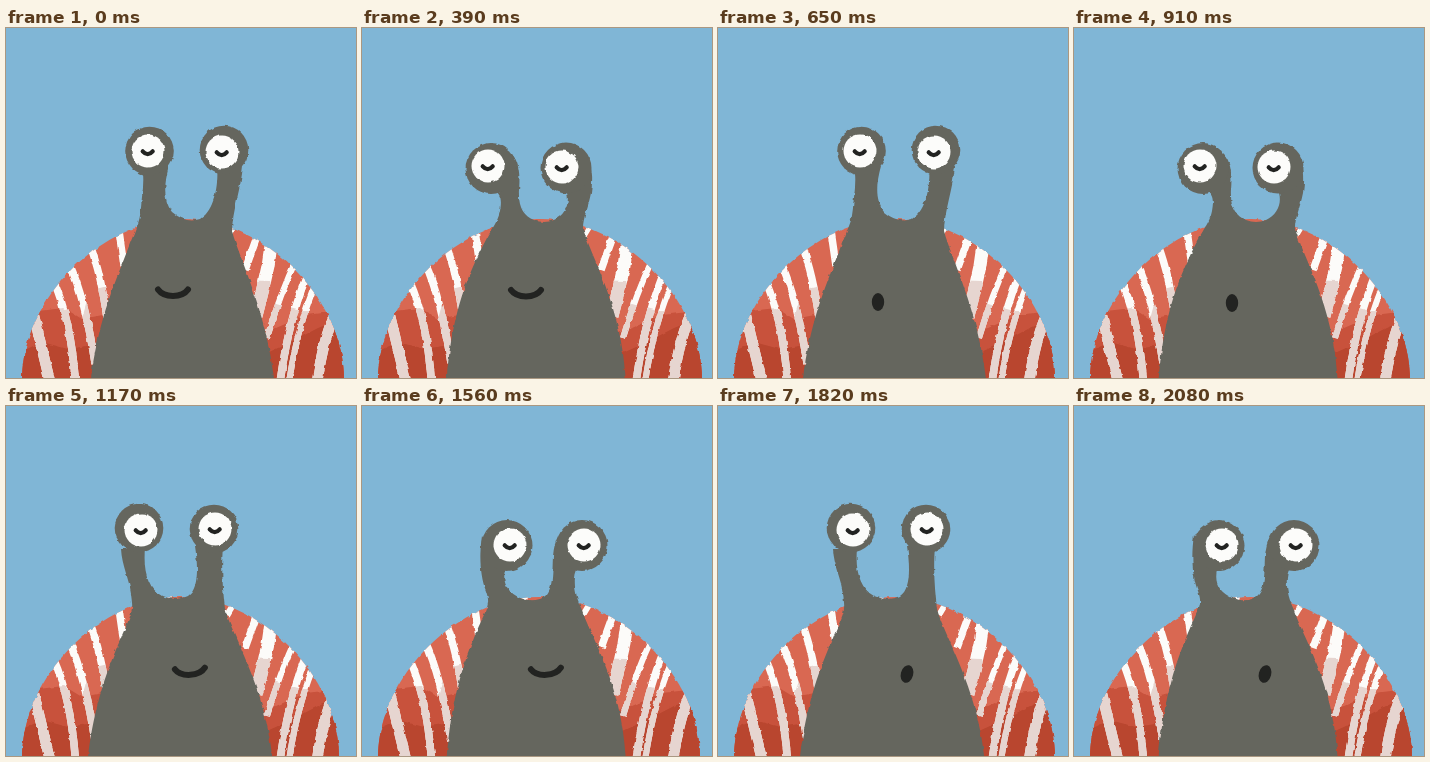
Recreate the animation shown at these times as an HTML page. Size 350x350 px, loop 2340 ms.

```html
<!DOCTYPE html>
<html>
<head>
<meta charset="utf-8">
<title>Swaying snail</title>
<style>
  html, body { margin: 0; width: 100%; height: 100%; overflow: hidden; background: #80b6d6; }
  svg { display: block; width: 100%; height: 100%; }
  .stripes { fill: none; stroke-linecap: butt; }
  .ink { fill: none; stroke: #222321; stroke-linecap: round; }
</style>
</head>
<body>
<svg viewBox="0 0 350 350">
  <defs>
    <filter id="rough" filterUnits="userSpaceOnUse" x="0" y="0" width="350" height="362" color-interpolation-filters="sRGB">
      <feTurbulence id="noise" type="fractalNoise" baseFrequency=".18" numOctaves="1" result="n"/>
      <feDisplacementMap in="SourceGraphic" in2="n" scale="3.5" xChannelSelector="R" yChannelSelector="G"/>
    </filter>
    <clipPath id="shellClip">
      <path id="shell" d="M0 362V352C0 270 80 191 161 191S322 270 322 352V362Z"/>
    </clipPath>
    <clipPath id="shadeClip">
      <path d="M10 298L32 283 58 280 76 291 84 262 112 256V362H10ZM234 252L264 253 270 276 296 283 342 284V362H234Z"/>
    </clipPath>
    <g id="stripes" class="stripes">
      <path stroke-width="6" d="M227 199L221 209M291 230Q274 266 261 310M312 250Q290 300 282 362M164 188L160 200"/>
      <path stroke-width="7.5" d="M48 254Q66 295 70 362M63 235Q79 270 89 335M84 217Q95 246 101 290M113 203L118 238M252 206L239 242M304 240Q282 290 273 362"/>
      <path stroke-width="10.5" d="M28 288L46 362M328 288Q316 315 310 362"/>
      <path stroke-width="13" d="M266 210L262 238Q257 262 250 288"/>
    </g>
  </defs>
  <rect width="350" height="350" fill="#80b6d6"/>
  <g filter="url(#rough)">
    <g clip-path="url(#shellClip)">
      <rect width="350" height="362" fill="#d96852"/>
      <path fill="#c8523c" d="M10 298L32 283 58 280 76 291 112 284V362H10ZM234 310L270 300 300 287 342 282V362H234Z"/>
      <path fill="#b9462f" d="M10 326L36 314 62 321 112 313V362H10ZM250 330L285 314 312 300 342 288V362H250Z"/>
      <use href="#stripes" stroke="#fcfbf9"/>
      <use href="#stripes" stroke="#e6d5d0" clip-path="url(#shadeClip)"/>
    </g>
  </g>
  <g filter="url(#rough)">
    <g fill="#65665e">
      <path id="body"/>
      <circle class="ring"/>
      <circle class="ring"/>
    </g>
    <circle class="white" r="16.5" fill="#fcfcfa"/>
    <circle class="white" r="16.5" fill="#fcfcfa"/>
  </g>
  <path class="lid ink" stroke-width="4.2" d="M-5 -1.2Q0 4.5 5 -1.2"/>
  <path class="lid ink" stroke-width="4.2" d="M-5 -1.2Q0 4.5 5 -1.2"/>
  <path id="smile" class="ink" stroke-width="6" d="M-15 -2.5C-9 6 9 6 15 -2.5"/>
  <ellipse id="oh" fill="#222321" rx="6.2" ry="9"/>
</svg>
<script>
// Eye entries: ring x, y, then white x, y
const poses = {
  upRight: {
    r: 24.3, eyes: [[143.5, 123, 142, 123], [218, 122, 216, 124]],
    body: 'M84 360C90 300 106 262 120 226S133 196 135 180C136 165 139 152 136 140L163 138C158 156 157 172 166 184Q180 196 194 191C207 184 213 160 211 138L237 138C235 160 226 185 226 203C233 230 262 285 269 360Z'
  },
  downLeft: {
    r: 25.5, eyes: [[129, 140.5, 126, 138], [204, 140, 200, 139]],
    body: 'M84 360C88 300 99 264 115 230S135 197 138 183C140 172 139 166 132 162L150 126C158 135 158 150 157 162C156 180 162 188 172 192Q182 196 192 192C203 187 208 176 205 165L224 128C231 140 231 150 229 165C226 180 221 190 221 200C228 228 262 280 264 360Z'
  },
  upLeft: {
    r: 24.3, eyes: [[133, 122, 135, 124], [208, 123, 209, 123]],
    body: 'M81 360C87 300 102 262 115 232S127 205 125 188C123 172 116 160 115 143L139 143C137 165 142 182 156 190Q170 196 182 190C193 183 192 160 189 140L217 140C215 165 217 185 219 203C226 230 262 285 267 360Z'
  },
  downRight: {
    r: 25.5, eyes: [[145, 139.5, 148, 139], [220, 139.5, 222, 139]],
    body: 'M84 360C88 300 99 264 112 232S129 200 124 185C118 170 117 148 120 130L143 164C140 178 146 186 158 192Q168 196 178 193C192 188 190 170 191 150Q192 138 196 130L216 162C210 172 213 190 220 204C228 230 262 280 264 360Z'
  }
};

// End time, pose, mouth, mouth x, y, tilt, right edge of the shell
const steps = [
  [390, 'upRight', 'smile', 167, 264, 0, 338],
  [650, 'downLeft', 'smile', 164, 264.5, 0, 340],
  [910, 'upRight', 'oh', 160, 274, 0, 337],
  [1170, 'downLeft', 'oh', 158, 275, 0, 336],
  [1560, 'upLeft', 'smile', 184, 265, -3, 333],
  [1820, 'downRight', 'smile', 184, 265, -3, 338],
  [2080, 'upLeft', 'oh', 189, 268, 15, 337],
  [2340, 'downRight', 'oh', 191, 268, 15, 338]
];

const $ = s => document.querySelectorAll(s);
const set = (el, attrs) => Object.entries(attrs).forEach(([k, v]) => el.setAttribute(k, v));
const [noise, body, smile, oh, shell] = ['#noise', '#body', '#smile', '#oh', '#shell'].map(s => $(s)[0]);
const rings = $('.ring'), whites = $('.white'), lids = $('.lid');
let shown = -1;

function draw(i) {
  const [, name, mouth, mx, my, tilt, right] = steps[i];
  const pose = poses[name];
  set(noise, { seed: i + 3 });
  set(shell, { transform: `translate(16 0) scale(${(right - 16) / 322} 1)` });
  set(body, { d: pose.body });
  pose.eyes.forEach(([x, y, wx, wy], k) => {
    set(rings[k], { cx: x, cy: y, r: pose.r });
    set(whites[k], { cx: wx, cy: wy });
    set(lids[k], { transform: `translate(${wx - 0.3} ${wy + 1.5})` });
  });
  for (const el of [smile, oh])
    set(el, {
      display: el.id === mouth ? 'inline' : 'none',
      transform: `translate(${mx} ${my}) rotate(${tilt})`
    });
}

function tick() {
  const t = performance.now() % 2340;
  const i = steps.findIndex(s => t < s[0]);
  if (i !== shown) draw(shown = i);
  requestAnimationFrame(tick);
}
tick();
</script>
</body>
</html>
```
